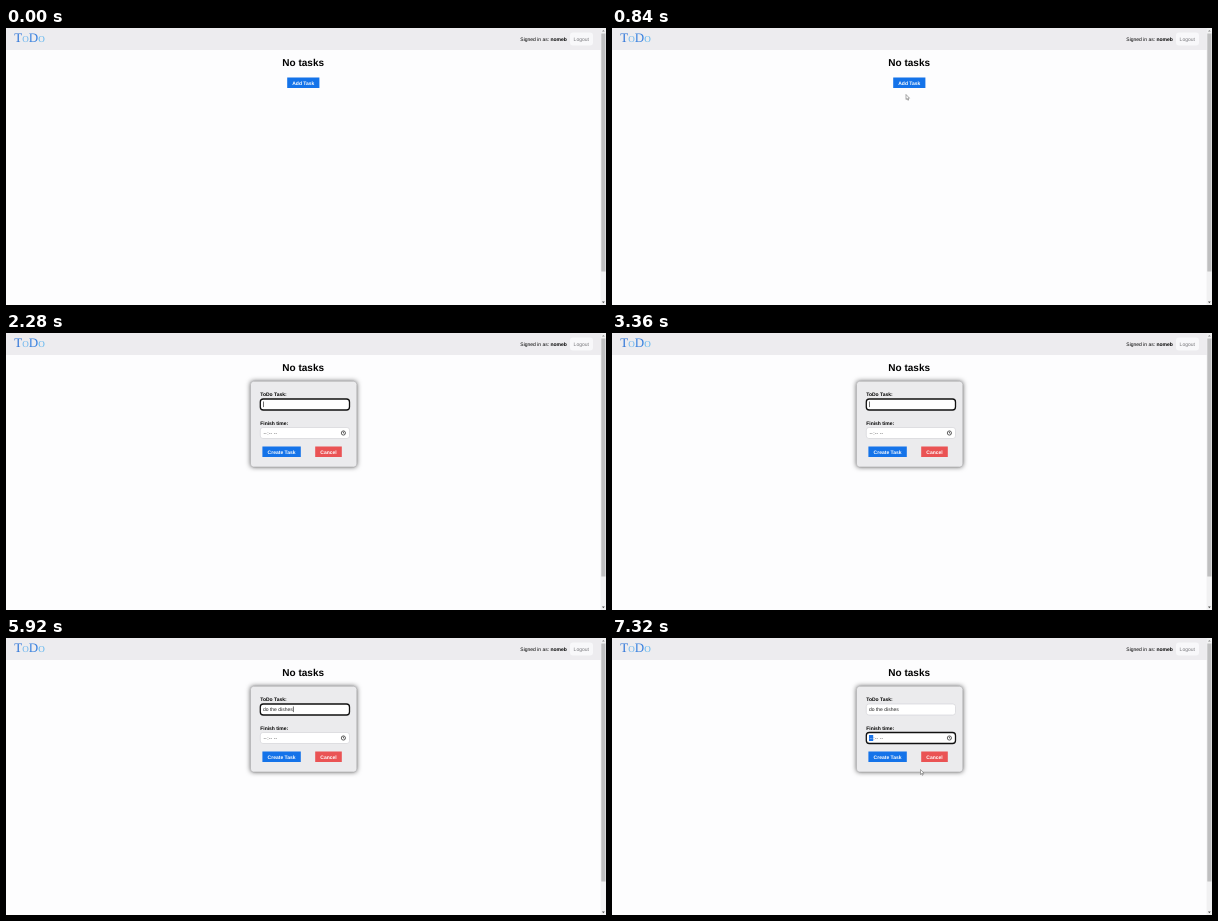
Write an HTML page with a canvas that moves like this. It is 600 by 277 pixels and loops after 8 s.

```html
<!DOCTYPE html>
<html lang="en">
<head>
<meta charset="utf-8">
<title>ToDo</title>
<style>
html, body { margin: 0; width: 100%; height: 100%; overflow: hidden; background: #fdfdfe; }
canvas { display: block; width: 600px; height: 277px; }
</style>
</head>
<body>
<canvas id="stage"></canvas>
<script>
const W = 600, H = 277, LOOP = 8000, STEP = 40;
const SANS = '"Liberation Sans", Arial, sans-serif';
const SERIF = '"Liberation Serif", Times, serif';
const BLUE = '#1473e9', RED = '#ea5354';

const FORM_OPEN = 1400, FOCUS_TASK = 2280, FOCUS_TIME = 6520, BLINK = 540;
const TASK = 'do the dishes';
const KEYS = [3880, 3920, 4120, 4200, 4400, 4480, 4560, 4720, 4880, 5040, 5120, 5480, 5560];

// Pointer legs: start, end, from, to
const LEGS = [
  [0, 840, [372, 162], [294, 66.5]],
  [840, 1200, [294, 66.5], [289.5, 55.5]],
  [1520, 1840, [289.5, 55.5], [283, 71]],
  [5920, 6480, [283, 71], [335, 98.5]],
  [6760, 7320, [335, 98.5], [308.5, 131.5]]
];

const canvas = document.getElementById('stage');
const ctx = canvas.getContext('2d');
const ratio = window.devicePixelRatio || 1;
canvas.width = W * ratio;
canvas.height = H * ratio;
ctx.scale(ratio, ratio);
if ('textRendering' in ctx) ctx.textRendering = 'geometricPrecision';

function rect(x, y, w, h, fill) {
  ctx.fillStyle = fill;
  ctx.fillRect(x, y, w, h);
}

function round(x, y, w, h, r, fill, stroke, line) {
  ctx.beginPath();
  ctx.roundRect(x, y, w, h, r);
  ctx.fillStyle = fill;
  ctx.fill();
  if (stroke) {
    ctx.strokeStyle = stroke;
    ctx.lineWidth = line;
    ctx.stroke();
  }
}

function poly(points, fill, stroke, line) {
  ctx.beginPath();
  points.forEach(([x, y]) => ctx.lineTo(x, y));
  ctx.closePath();
  ctx.fillStyle = fill;
  ctx.fill();
  if (stroke) {
    ctx.strokeStyle = stroke;
    ctx.lineWidth = line;
    ctx.stroke();
  }
}

function text(str, x, y, { size = 5, bold = false, color = '#000', align = 'left' } = {}) {
  ctx.font = `${bold ? 'bold ' : ''}${size}px ${SANS}`;
  ctx.textAlign = align;
  ctx.fillStyle = color;
  ctx.fillText(str, x, y);
}

function button(label, x, y, w, fill) {
  rect(x, y, w, 10.5, fill);
  text(label, x + w / 2, y + 7.1, { bold: true, color: '#fff', align: 'center' });
}

function wordmark() {
  let x = 8.3;
  const parts = [['T', 13, '#2f75d8'], ['O', 9.1, '#69b4ee'], ['D', 13, '#3a82df'], ['O', 9.1, '#58b3ef']];
  ctx.textAlign = 'left';
  for (const [ch, size, color] of parts) {
    ctx.font = `${size}px ${SERIF}`;
    ctx.fillStyle = color;
    ctx.fillText(ch, x, 14);
    x += ctx.measureText(ch).width;
  }
}

function page() {
  rect(0, 0, W, H, '#fdfdfe');
  rect(0, 0, 595, 22, '#edecef');
  wordmark();
  text('Signed in as:', 514.3, 12.6);
  text('nomeb', 544.5, 12.6, { bold: true });
  round(564, 4.5, 23, 13, 3, '#f8f8fa');
  text('Logout', 567.6, 12.6, { color: '#77777b' });
  text('No tasks', 297.2, 37.6, { size: 10, bold: true, align: 'center' });

  rect(594.6, 0, 5.4, H, '#f1f1f2');
  rect(595.3, 5.5, 4.2, 238, '#bfbfc0');
  poly([[596, 3.5], [597.4, 1.9], [598.8, 3.5]], '#8a8a8a');
  poly([[596, 273.6], [597.4, 275.2], [598.8, 273.6]], '#505050');
}

function field(y, h, focused) {
  if (focused) round(254.3, y, 89.2, h, 3, '#fff', '#111', 1.3);
  else round(254.3, y, 89.2, h, 2.6, '#fff', '#cfcfd3', 0.6);
}

function clock(x, y) {
  ctx.strokeStyle = '#222';
  ctx.lineWidth = 0.7;
  ctx.beginPath();
  ctx.arc(x, y, 2.1, 0, Math.PI * 2);
  ctx.moveTo(x, y - 1.3);
  ctx.lineTo(x, y);
  ctx.lineTo(x + 0.9, y + 0.5);
  ctx.stroke();
}

function form(t) {
  const onTime = t >= FOCUS_TIME;
  const onTask = t >= FOCUS_TASK && !onTime;

  ctx.save();
  ctx.shadowColor = 'rgba(0,0,0,0.65)';
  ctx.shadowBlur = 5 * ratio;
  round(244.5, 48.3, 106.3, 85.7, 3, '#ebebed');
  ctx.restore();
  round(244.5, 48.3, 106.3, 85.7, 3, '#ebebed', '#a4a4a6', 0.6);

  text('ToDo Task:', 254.2, 63, { bold: true });
  field(66, 11, onTask);
  const count = KEYS.filter(k => t >= k).length;
  const typed = TASK.slice(0, count);
  text(typed, 257, 73, { color: '#222' });
  if (onTask) {
    const last = count ? KEYS[count - 1] : FOCUS_TASK;
    if (Math.floor((t - last) / BLINK) % 2 === 0) {
      rect(257 + ctx.measureText(typed).width + 0.2, 68.5, 0.6, 5.6, '#111');
    }
  }

  text('Finish time:', 254.2, 91.7, { bold: true });
  field(94.5, 11, onTime);
  if (onTime) rect(257, 97, 4.2, 6, '#1a73e8');
  text('--', 257.4, 101.8, { color: onTime ? '#fff' : '#444' });
  text(':', 261.3, 101.8, { color: '#444' });
  text('--', 262.8, 101.8, { color: '#444' });
  text('--', 267.8, 101.8, { color: '#444' });
  clock(337.4, 100);

  button('Create Task', 256.4, 113.5, 38.4, BLUE);
  button('Cancel', 309.2, 113.5, 26.6, RED);
}

function pointerAt(t) {
  let pos = LEGS[0][2];
  for (const [start, end, from, to] of LEGS) {
    if (t < start) break;
    const u = Math.min(1, (t - start) / (end - start));
    const e = u * u * (3 - 2 * u);
    pos = from.map((v, i) => v + (to[i] - v) * e);
  }
  return pos;
}

function arrow(x, y) {
  const shape = [[0, 0], [0, 5], [1.1, 4], [1.9, 5.8], [2.7, 5.4], [1.9, 3.7], [3.5, 3.7]];
  poly(shape.map(([a, b]) => [x + a, y + b]), '#fff', '#555', 0.5);
}

function hand(x, y) {
  const shape = [[0, 0], [0.9, 0], [1.1, 2.4], [3.9, 3.1], [3.7, 5.4], [3.1, 7], [0.7, 7],
    [-1.3, 4.4], [-0.9, 3.7], [0, 4.3]];
  poly(shape.map(([a, b]) => [x + a, y + b]), '#fff', '#555', 0.55);
}

function pointer(t) {
  if (t < STEP) return;
  const [x, y] = pointerAt(t);
  const inTask = t >= FORM_OPEN && y > 66 && y < 77;
  if (inTask) return;
  const onButton = t <= 1520 && y < 60;
  (onButton ? hand : arrow)(x, y);
}

function draw(now) {
  const t = Math.floor((now % LOOP) / STEP) * STEP;
  page();
  if (t < FORM_OPEN) button('Add Task', 281.2, 49.5, 32.2, BLUE);
  else form(t);
  pointer(t);
}

const begin = performance.now();
function tick() {
  draw(performance.now() - begin);
  requestAnimationFrame(tick);
}
tick();
</script>
</body>
</html>
```
